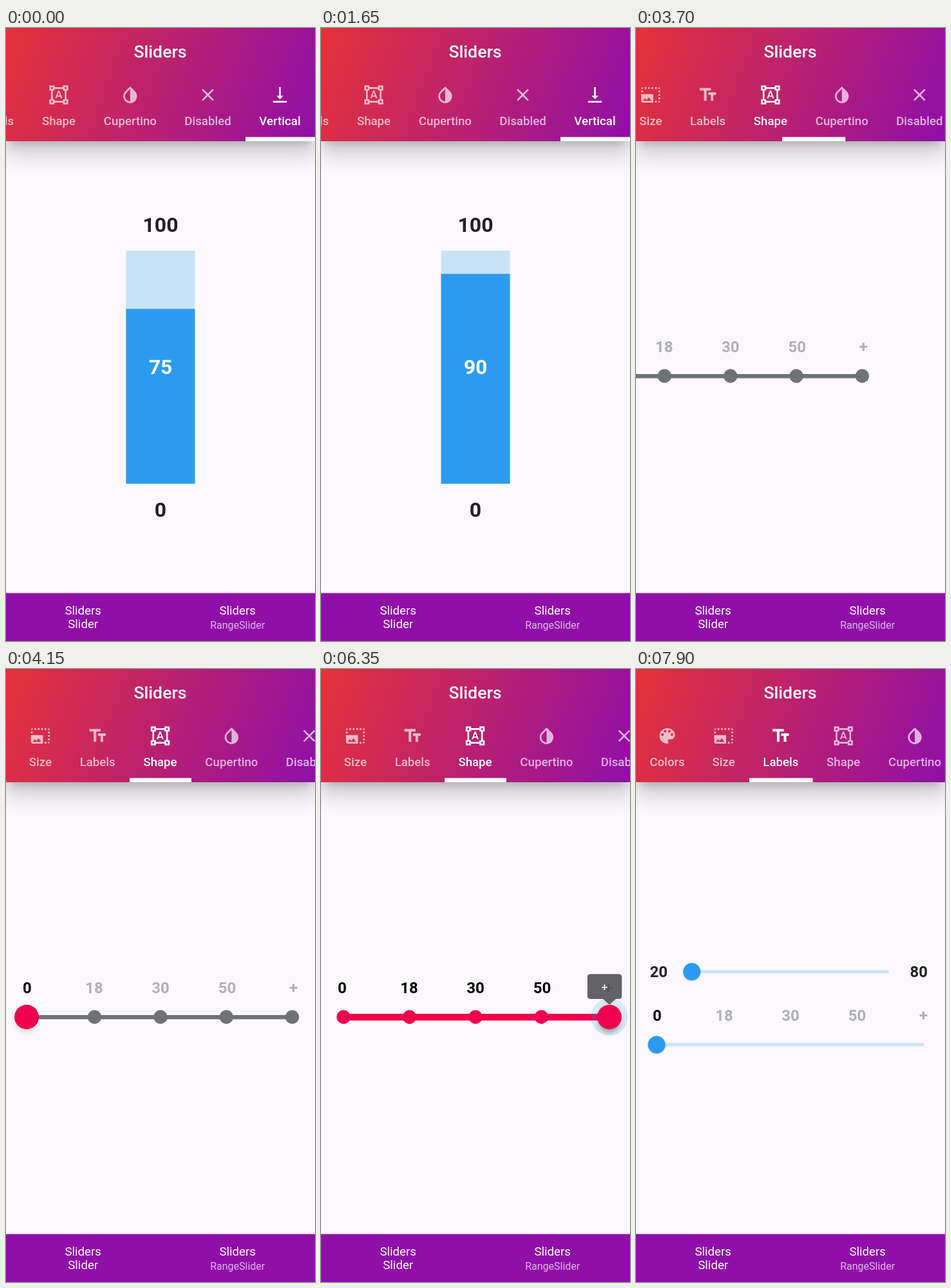
An HTML page for the animation above (8 s loop, 480 by 953 pixels).

```html
<!DOCTYPE html>
<html lang="en">
<head>
<meta charset="utf-8">
<title>Sliders</title>
<style>
  html, body { margin: 0; width: 100%; height: 100%; overflow: hidden; background: #faf8fc; }
  svg { display: block; width: 100vw; height: 100vh; }
  text { font-family: Roboto, sans-serif; text-anchor: middle; }
  .tab { font-size: 18.67px; font-weight: 500; fill: #fff; }
  .foot { font-size: 18.67px; fill: #fff; }
  .big { font-size: 32px; font-weight: 700; fill: #212121; }
  .mark { font-size: 24px; font-weight: 700; fill: #000; }
  .off { fill: #b1b0b3; }
</style>
</head>
<body>
<svg id="stage" viewBox="0 0 480 953" preserveAspectRatio="none"></svg>
<script>
const LOOP = 8000;
const RED = '#ee004c', GRAY = '#6e7378', BLUE = '#2c9bef', PALE = '#c8e3f5';
const MARKS = ['0', '18', '30', '50', '+'];
const MARK_X = [33, 137, 240, 343.5, 446.5];
const DOT_X = [35, 137.5, 240, 342.3, 444.6];

const hole = (x, y) => `M${x - 1.5} ${y}a1.5 1.5 0 1 0 3 0 1.5 1.5 0 1 0-3 0z`;
const ICONS = {
  palette: 'M12 3c-4.97 0-9 4.03-9 9s4.03 9 9 9c.83 0 1.5-.67 1.5-1.5 0-.39-.15-.74-.39-1.01-.23-.26-.38-.61-.38-.99 0-.83.67-1.5 1.5-1.5H16c2.76 0 5-2.24 5-5 0-4.42-4.03-8-9-8z'
    + hole(6.5, 10.5) + hole(9.5, 6.5) + hole(14.5, 6.5) + hole(17.5, 10.5),
  size: 'M21 15h2v2h-2zM21 11h2v2h-2zM23 19h-2v2c1 0 2-1 2-2zM13 3h2v2h-2zM21 7h2v2h-2zM21 3v2h2c0-1-1-2-2-2zM1 7h2v2H1zM17 3h2v2h-2zM17 19h2v2h-2zM3 3C2 3 1 4 1 5h2zM9 3h2v2H9zM5 3h2v2H5zM1 11v8c0 1.1.9 2 2 2h12V11zM3 19l2.5-3.21 1.79 2.15 2.5-3.22L13 19z',
  text: 'M2.5 4v3h5v12h3V7h5V4zM21.5 9h-9v3h3v7h3v-7h3z',
  shape: 'M23 7V1h-6v2H7V1H1v6h2v10H1v6h6v-2h10v2h6v-6h-2V7zM3 3h2v2H3zM5 21H3v-2h2zM17 19H7v-2H5V7h2V5h10v2h2v10h-2zM21 21h-2v-2h2zM19 5V3h2v2zM13.73 14h-3.49l-.73 2H7.89l3.4-9h1.4l3.41 9h-1.63zM10.69 12.74h2.61L12 8.91z',
  drop: 'M17.66 7.93L12 2.27 6.34 7.93c-3.12 3.12-3.12 8.19 0 11.31 3.12 3.12 8.2 3.12 11.32 0 3.12-3.12 3.12-8.19 0-11.31zM12 19.59c-1.6 0-3.11-.62-4.24-1.76C6.62 16.69 6 15.19 6 13.59s.62-3.11 1.76-4.24L12 5.1z',
  cross: 'M19 6.41L17.59 5 12 10.59 6.41 5 5 6.41 10.59 12 5 17.59 6.41 19 12 13.41 17.59 19 19 17.59 13.41 12z',
  down: 'M16 13h-3V3h-2v10H8l4 4zM4 19v2h16v-2z'
};
const TABS = [
  ['Colors', 'palette', -34.2], ['Size', 'size', 53.4], ['Labels', 'text', 142.2], ['Shape', 'shape', 239.5],
  ['Cupertino', 'drop', 350.4], ['Disabled', 'cross', 471], ['Vertical', 'down', 583]
];

const label = (x, y, cls, str, extra = '') => `<text x="${x}" y="${y}" class="${cls}" ${extra}>${str}</text>`;
const bar = (x, y, w, h, fill, extra = '') => `<rect x="${x}" y="${y}" width="${w}" height="${h}" fill="${fill}" ${extra}/>`;
const disc = (x, y, r, fill, extra = '') => `<circle cx="${x}" cy="${y}" r="${r}" fill="${fill}" ${extra}/>`;
const blur = (px, a) => `style="filter:blur(${px}px)" opacity="${a}"`;

const tab = ([name, icon, x]) => `<g id="tab${name}" opacity=".68">
  <path transform="translate(${x - 16} 88) scale(1.3333)" fill="#fff" fill-rule="evenodd" d="${ICONS[icon]}"/>
  ${label(x, 150.7, 'tab', name)}</g>`;

const plainSlider = (x, y, end) => bar(x, y - 2.5, end - x, 5, PALE, 'rx="2.5"')
  + disc(x, y + 1.5, 13, '#000', blur(1.5, .25)) + disc(x, y, 13.5, BLUE);

document.getElementById('stage').innerHTML = `
<defs><linearGradient id="sky" gradientUnits="userSpaceOnUse" x1="0" y1="0" x2="480" y2="176">
  <stop stop-color="#e53238"/><stop offset="1" stop-color="#8f0fa8"/></linearGradient></defs>
${bar(0, 0, 480, 953, '#faf8fc')}
<g id="pageVertical">
  ${label(240, 317, 'big', '100')}${label(240, 759.5, 'big', '0')}
  ${bar(186.5, 346, 107, 362.5, PALE)}${bar(186.5, 346, 107, 0, BLUE, 'id="level"')}
  ${label(240, 538.3, 'big', '75', 'id="amount" style="fill:#fff"')}
</g>
<g id="pageShape">
  ${MARKS.map((m, i) => label(MARK_X[i], 504, 'mark', m, `id="mark${i}"`)).join('')}
  ${bar(35, 538, 410, 6.5, GRAY)}${bar(35, 536, 0, 10.5, RED, 'id="run"')}
  ${DOT_X.map((x, i) => disc(x, 541, 10.7, GRAY, `id="dot${i}"`)).join('')}
  <g id="thumb">
    ${disc(0, 541, 31.5, '#3ca0d2', 'id="halo" opacity=".18"')}
    ${disc(0, 548, 16, '#000', 'id="shade" style="filter:blur(4px)"')}
    ${disc(0, 541, 19, RED)}
    <g id="tip">
      <path id="bubble" fill="#5b5a5c" fill-opacity=".95"/>
      ${label(0, 0, 'tab', '', 'id="tipText"')}
    </g>
  </g>
</g>
<g id="pageLabels">
  ${label(35.3, 479.3, 'mark', '20', 'style="fill:#212121"')}${label(439.2, 479.3, 'mark', '80', 'style="fill:#212121"')}
  ${plainSlider(86.7, 470.5, 393)}
  ${MARKS.map((m, i) => label(MARK_X[i], 546.5, i ? 'mark off' : 'mark', m)).join('')}
  ${plainSlider(32, 584, 448)}
</g>
${bar(7, 11, 466, 169, '#000', blur(7.5, .18))}
${bar(-3, 21, 486, 178, '#000', blur(16, .1))}
${bar(-7, 8, 494, 183, '#000', blur(20, .07))}
${bar(0, 0, 480, 176, 'url(#sky)')}
${label(239.5, 46, 'tab', 'Sliders', 'style="font-size:26.67px"')}
<g id="strip">${TABS.map(tab).join('')}${bar(0, 169.5, 0, 6.5, '#fff', 'id="line"')}</g>
${bar(0, 878.5, 480, 74.5, '#900fa8')}
${label(119.7, 912, 'foot', 'Sliders')}${label(119.7, 933.3, 'foot', 'Slider')}
${label(359.7, 912, 'foot', 'Sliders')}${label(359.7, 934, 'foot', 'RangeSlider', 'style="font-size:16px" opacity=".7"')}
`;

const $ = id => document.getElementById(id);
const set = (id, attrs) => { for (const k in attrs) $(id).setAttribute(k, attrs[k]); };
const clamp = x => Math.min(1, Math.max(0, x));
const mix = (a, b, k) => a + (b - a) * k;

// cubic-bezier(.25, .1, .25, 1)
function ease(x) {
  if (x <= 0 || x >= 1) return clamp(x);
  const curve = (u, a, b) => 3 * u * (1 - u) ** 2 * a + 3 * u * u * (1 - u) * b + u ** 3;
  let lo = 0, hi = 1;
  for (let i = 0; i < 20; i++) {
    const mid = (lo + hi) / 2;
    if (curve(mid, .25, .25) < x) lo = mid; else hi = mid;
  }
  return curve(lo, .1, 1);
}

function along(keys, t) {
  const i = keys.findIndex(k => k[0] > t);
  if (i === 0) return keys[0][1];
  if (i < 0) return keys[keys.length - 1][1];
  const [t0, a] = keys[i - 1], [t1, b] = keys[i];
  return mix(a, b, (t - t0) / (t1 - t0));
}

// Finger paths; the sliders snap to steps and glide to each within 75 ms.
const LEVEL = [[50, 75], [500, 34], [918, 57.5], [1550, 92], [1700, 91], [1780, 86], [1920, 90], [2200, 90], [2480, 75]];
const INDEX = [[4400, 0], [4950, 4], [5080, 4], [5450, 2], [5540, 1.8], [5590, 1.5], [5700, 1], [5800, 1], [6000, 3], [6150, 4]];
const snap = (keys, step, t) => Math.round(along(keys, t) / step) * step;
function glide(keys, step, t) {
  let sum = 0;
  for (let i = 0; i < 25; i++) sum += snap(keys, step, t - 1.5 - i * 3);
  return sum / 25;
}

function drawLevel(t) {
  const h = 362.5 * glide(LEVEL, 5, t) / 100;
  set('level', { y: 708.5 - h, height: h });
  $('amount').textContent = snap(LEVEL, 5, t);
}

function drawShape(t) {
  const index = snap(INDEX, 1, t), x = 32 + 104 * glide(INDEX, 1, t);
  const press = clamp((t - 4350) / 100) * clamp(1 - (t - 6342) / 100);
  const lit = index === 2 ? 3 : index;
  MARKS.forEach((m, i) => {
    set('mark' + i, { class: i <= lit ? 'mark' : 'mark off' });
    set('dot' + i, { fill: DOT_X[i] <= x + 4 ? RED : GRAY });
  });
  set('run', { width: Math.max(0, x - 35) });
  set('thumb', { transform: `translate(${x} 0)` });
  set('halo', { r: 31.5 * press });
  set('shade', { opacity: .15 + .25 * press });

  const last = index === 4, left = last ? -37.5 : Math.max(-32, 11 - x), right = last ? 21.2 : left + 64;
  set('bubble', { d: `M${left + 5}-52.5H${right - 5}q5 0 5 5v32.5q0 5-5 5H11L0 0-11-10H${left + 5}q-5 0-5-5v-32.5q0-5 5-5z` });
  set('tipText', { x: (left + right) / 2, y: -24.7 });
  $('tipText').textContent = MARKS[index];
  set('tip', { transform: `translate(0 522) scale(${press})`, visibility: press ? 'visible' : 'hidden' });
}

function drawTabs(t) {
  const a = ease((t - 3550) / 300), b = ease((t - 7000) / 300);
  const slide = (id, x) => set(id, { transform: `translate(${x} 0)` });
  slide('pageVertical', 480 * a);
  slide('pageShape', 480 * (a + b - 1));
  slide('pageLabels', 480 * (b - 1));
  slide('strip', -157.5 * (1 - a) + 82.7 * b);
  const left = mix(mix(529.5, 192, a), 93.3, b), right = mix(mix(637.5, 288, a), 191.8, b);
  set('line', { x: left, width: right - left });
  const glow = (name, k) => set('tab' + name, { opacity: mix(.68, 1, k) });
  glow('Vertical', 1 - a);
  glow('Shape', a * (1 - b));
  glow('Labels', b);
}

const start = performance.now();
function frame() {
  const t = (performance.now() - start) % LOOP;
  drawLevel(t);
  drawShape(t);
  drawTabs(t);
  requestAnimationFrame(frame);
}
frame();
</script>
</body>
</html>
```
